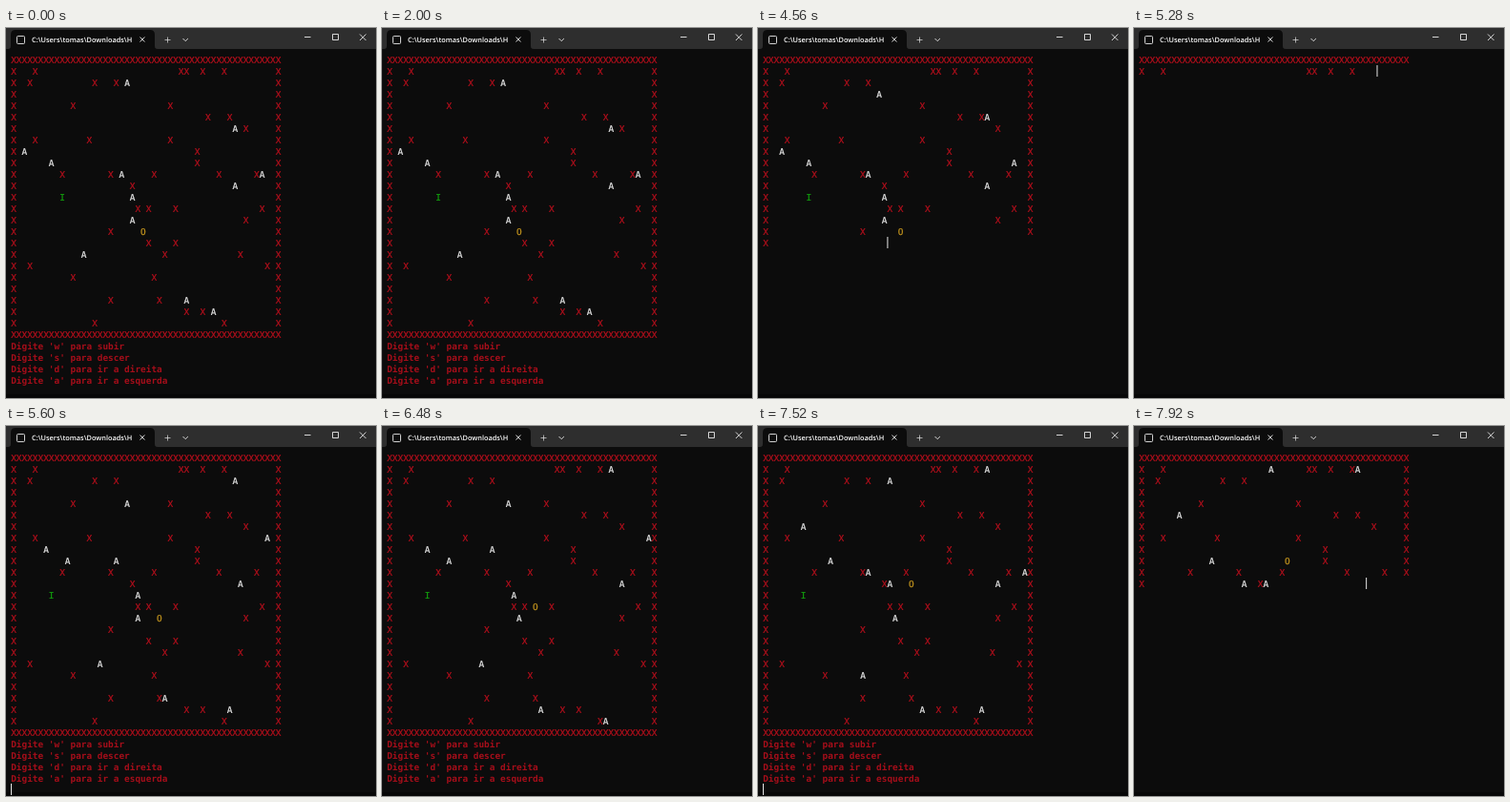
Recreate the animation shown at these times as an HTML page. Size 388 by 388 pixels, loop 8 s.

```html
<!DOCTYPE html>
<html lang="pt">
<head>
<meta charset="utf-8">
<title>Terminal maze</title>
<style>
  html, body { margin: 0; width: 100%; height: 100%; overflow: hidden; background: #0c0c0c; }
  svg { display: block; width: 100vw; height: 100vh; }
  text { white-space: pre; text-rendering: geometricPrecision; }
  #screen text { font: 9.42px "DejaVu Sans Mono", monospace; color: #b40f1c; }
  #screen text, #screen tspan { fill: currentColor; stroke: currentColor; stroke-width: .2; }
  #screen .label { font-weight: bold; color: #a60e1a; stroke: none; }
  #screen .A { color: #e6e6e6; }
  #screen .O { color: #c8981e; }
  #screen .I { color: #13a10e; }
  .title { font: 600 7.35px "Open Sans", sans-serif; fill: #fff; }
  .icon { fill: none; stroke: #e8e8e8; stroke-width: .9; }
</style>
</head>
<body>
<svg viewBox="0 0 388 388">
  <rect width="388" height="388" fill="#0c0c0c"/>
  <rect y="384" width="388" height="4" fill="#070707"/>
  <rect width="388" height="22" fill="#2e2e2e"/>
  <path d="M2 22Q5 22 5 19V7Q5 2 10 2H151Q156 2 156 7V19Q156 22 159 22Z" fill="#0c0c0c"/>
  <rect class="icon" x="11.5" y="8.5" width="8" height="8" rx="1"/>
  <text class="title" x="27" y="15">C:\Users\tomas\Downloads\H</text>
  <path class="icon" d="M140.5 9.5l5 5m0-5l-5 5M185.5 11l2.7 2.7l2.7-2.7"/>
  <path class="icon" d="M166.5 12.5h6m-3-3v6" stroke-opacity=".75"/>
  <path class="icon" d="M313 9.5h6.5M342.5 6.5h6v6h-6zM371 6.5l6.5 6.5m0-6.5l-6.5 6.5"/>
  <g id="screen"></g>
  <rect id="cursor" width="1" height="12" fill="#e6e6e6"/>
</svg>
<script>
const LOOP = 8000, STEP = 80, BLINK = 530;
const COLS = 50, RATE = 7; // characters printed per ms
const X0 = 5.2, Y0 = 37, CELL = 5.67, LINE = 12;

// The level: X wall, A enemy, O player, I goal. The right wall is added below.
const level = `
X...X..........................XX..X...X
X..X...........X...X.A
X
X..........X.................X
X...................................X...X
X........................................A.X
X...X.........X..............X
X.A...............................X
X......A..........................X
X........X........X.A.....X...........X......XA
X.....................X..................A
X........I............A
X......................X.X....X...............X
X.....................A....................X
X.................X.....O
X........................X....X
X............A..............X.............X
X..X...........................................X
X..........X..............X
X
X.................X........X....A
X...............................X..X.A
X..............X.......................X`.trim().split("\n");

const labels = [
  "Digite 'w' para subir", "Digite 's' para descer",
  "Digite 'd' para ir a direita", "Digite 'a' para ir a esquerda"
];

// One move per turn, for the actors in reading order.
const moves = [
  "dd..rururu", "uuuuu...l.", "rrrrruu.u.", "rr.rr.r.r.", "l.u.u.ddd.",
  "uururddddd", "..r.r.....", "l.l.......", ".r....u...", "..r.rud...",
  "rrruuuu.uu", "rrrdrdr.d.", "lllld.r.r.", "rr.rd.u.r."
];

// When each turn starts to print; the first is long done.
const turnStarts = [-1032, 4442.4, 4885, 5266.5, 5400, 5690, 6700, 7020, 7262, 7540, 7835.4];

const border = "X".repeat(COLS);
const floor = level.map(s => s.replace(/[^X]/g, " ").padEnd(COLS - 1) + "X");
const actors = level.flatMap((s, i) =>
  [...s.matchAll(/[AOI]/g)].map(m => ({ glyph: m[0], col: m.index, row: i + 1 })));

function linesAt(turn) {
  const grid = [border, ...floor, border].map(s => [...s]);
  actors.forEach(({ glyph, col, row }, i) => {
    for (const m of moves[i].slice(0, turn)) {
      col += (m === "r") - (m === "l");
      row += (m === "d") - (m === "u");
    }
    grid[row][col] = glyph;
  });
  return [...grid.map(cells => cells.join("")), ...labels];
}

const turns = turnStarts.map((start, i) => {
  const lines = linesAt(i);
  return { start, lines, end: start + lines.join("").length / RATE };
});

const screen = document.getElementById("screen");
const cursor = document.getElementById("cursor");
const rows = turns[0].lines.map((_, r) => {
  const line = document.createElementNS("http://www.w3.org/2000/svg", "text");
  line.setAttribute("x", X0);
  line.setAttribute("y", Y0 + r * LINE);
  if (r >= level.length + 2) line.setAttribute("class", "label");
  return screen.appendChild(line);
});

let shown = -1;

function draw(time) {
  const t = Math.floor(time / STEP) * STEP;
  if (t === shown) return;
  shown = t;

  const turn = turns.findLast(p => p.start <= t);
  let left = Math.floor((t - turn.start) * RATE);
  let curRow = 0, curCol = 0;
  turn.lines.forEach((line, r) => {
    const part = line.slice(0, Math.max(0, left));
    rows[r].innerHTML = part.replace(/[AOI]/g, g => `<tspan class="${g}">${g}</tspan>`);
    if (left >= line.length) curRow = r + 1;
    else if (left > 0) curCol = left;
    left -= line.length;
  });

  cursor.setAttribute("x", 5 + curCol * CELL);
  cursor.setAttribute("y", 27 + curRow * LINE);
  const lit = t < turn.end || Math.floor((t - turn.end) / BLINK) % 2 === 0;
  cursor.setAttribute("visibility", lit ? "visible" : "hidden");
}

const start = performance.now();
function tick() {
  draw((performance.now() - start) % LOOP);
  requestAnimationFrame(tick);
}
tick();
</script>
</body>
</html>
```
